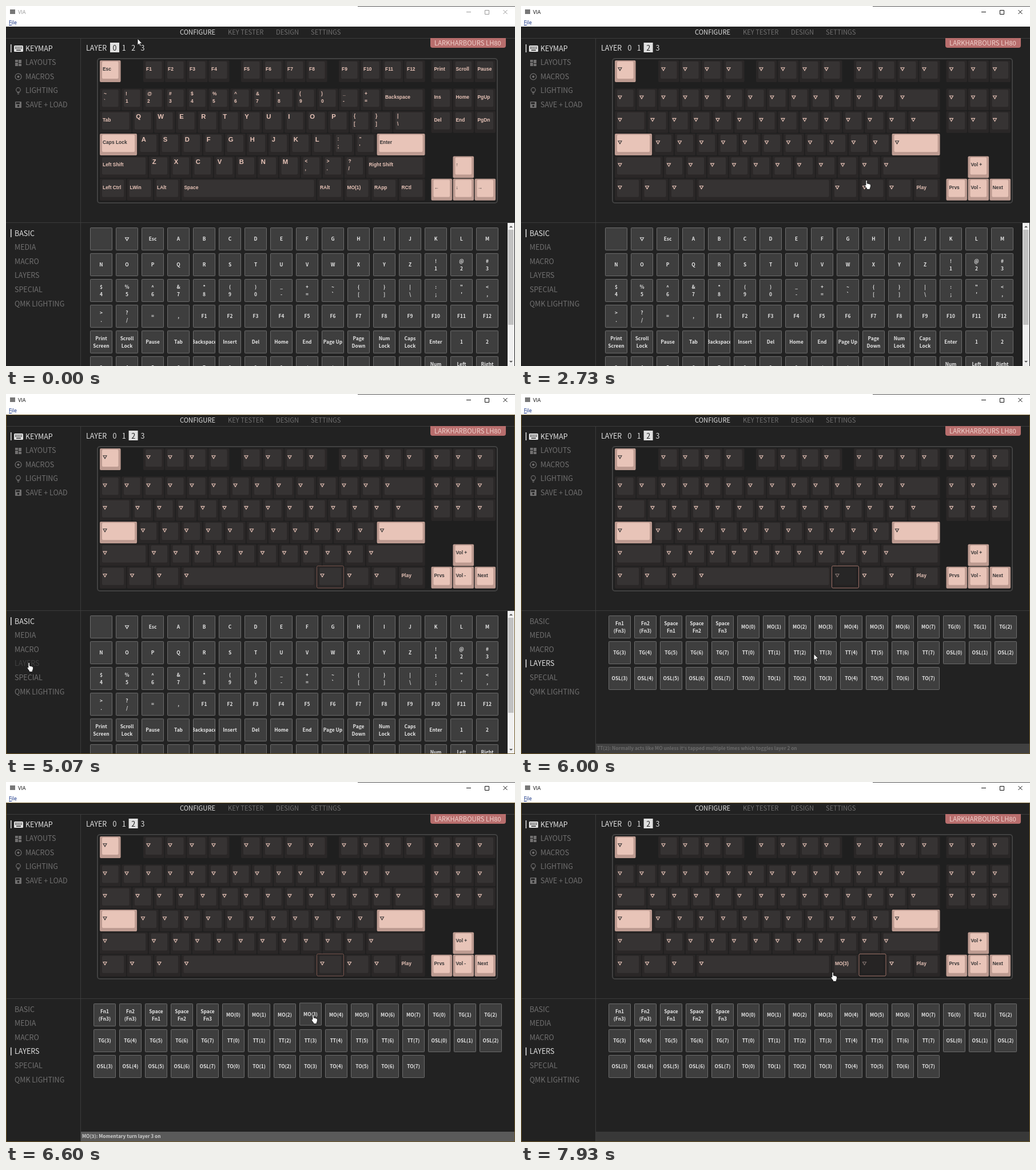
These frames come from a looping animation (890 px wide and 629 px high, 8000 ms). An HTML page with a canvas:

```html
<!DOCTYPE html>
<html lang="en">
<head>
<meta charset="utf-8">
<title>VIA</title>
<style>
html, body { margin: 0; width: 100%; height: 100%; overflow: hidden; background: #222; }
canvas { display: block; }
</style>
</head>
<body>
<canvas id="stage" width="890" height="629"></canvas>
<script>
const c = document.getElementById('stage').getContext('2d');
const UI = '"Noto Sans CJK JP", "Noto Sans CJK SC", "Noto Sans", sans-serif';
const CAP = '"Liberation Sans", Arial, sans-serif';
const SYSTEM = '"Open Sans", "Noto Sans", sans-serif';
const LIGHT = '#e2e2e2', GREY = '#717070', DARK = '#222', PINK = '#e8c4b8';
const LOOP = 8000, ACTIVATE = 800, TO_LAYER1 = 1000, TO_LAYER2 = 2330;
const FOCUS = 3470, SELECT = 3500, OPEN_LAYERS = 5100, ASSIGN = 6970;

// In key labels "·" is a space, "¶" a line break, "=n" a width and ">n" a gap.
const ROWS = [
  [0, 'Esc >1 F1 F2 F3 F4 >.5 F5 F6 F7 F8 >.5 F9 F10 F11 F12 >.25 Print Scroll Pause'],
  [1.25, '~` !1 @2 #3 $4 %5 ^6 &7 *8 (9 )0 _- += Backspace=2 >.25 Ins Home PgUp'],
  [2.25, 'Tab=1.5 Q W E R T Y U I O P {[ }] |\\=1.5 >.25 Del End PgDn'],
  [3.25, 'Caps·Lock=1.75 A S D F G H J K L :; "\' Enter=2.25'],
  [4.25, 'Left·Shift=2.25 Z X C V B N M <, >. ?/ Right·Shift=2.75 >1.25 ↑'],
  [5.25, 'Left·Ctrl=1.25 LWin=1.25 LAlt=1.25 Space=6.25 RAlt=1.25 MO(1)=1.25 RApp=1.25 RCtl=1.25 >.25 ← ↓ →']
];
const ACCENTS = ['Esc', 'Caps·Lock', 'Enter', '↑', '←', '↓', '→'];
const LAYERS = [null, {
  Esc: 'Reset', Print: 'RGBMd+', Scroll: 'RGBMd-', Pause: 'RGBMdSW',
  Ins: 'Hue·-', Home: 'Sat·-', PgUp: 'Brght-', Del: 'Sat·+', End: 'Brght+', PgDn: 'RGB¶SPI',
  N: 'NKRO', RApp: 'MO(2)', '←': 'Hue·+', '↓': 'RGBMd', '→': 'RGBMd'
}, { RCtl: 'Play', '↑': 'Vol·+', '←': 'Prvs', '↓': 'Vol·-', '→': 'Next' }];

const keys = [];
for (const [v, row] of ROWS) {
  let u = 0;
  for (const token of row.split(' ')) {
    const gap = token.match(/^>([\d.]*\d)$/);
    if (gap) { u += +gap[1]; continue; }
    const [, name, size = 1] = token.match(/^(.+?)(?:=([\d.]+))?$/);
    keys.push({ name, x: 164 + u * 38, y: 95 + v * 39.4, w: size * 38 - 1.4, accent: ACCENTS.includes(name) });
    u += +size;
  }
}

const BASIC = ('· ▽ Esc A B C D E F G H I J K L M N O P Q R S T U V W X Y Z !1 @2 #3 ' +
  '$4 %5 ^6 &7 *8 (9 )0 _- += ~` {[ }] |\\ :; "\' <, >. ?/ = , F1 F2 F3 F4 F5 F6 F7 F8 F9 F10 F11 F12 ' +
  'Print¶Screen Scroll¶Lock Pause Tab Backspace Insert Del Home End Page·Up Page¶Down Num¶Lock Caps¶Lock Enter 1 2 ' +
  '3 4 5 6 7 8 9 0 / * - + . Num¶Enter Left¶Shift Right¶Shift').split(' ');
const TIPS = {
  MO: n => `Momentary turn layer ${n} on`,
  TG: n => `Toggle layer ${n} on/off`,
  TT: n => `Normally acts like MO unless it's tapped multiple times which toggles layer ${n} on`,
  OSL: n => `Switch to layer ${n} for one keypress`,
  TO: n => `Turn on layer ${n} when pressed`
};
const LAYER_KEYS = 'Fn1¶(Fn3) Fn2¶(Fn3) Space¶Fn1 Space¶Fn2 Space¶Fn3'.split(' ');
for (const kind in TIPS) for (let n = 0; n < 8; n++) LAYER_KEYS.push(`${kind}(${n})`);

const SIDE = ['KEYMAP', 'LAYOUTS', 'MACROS', 'LIGHTING', 'SAVE + LOAD'];
const TABS = ['BASIC', 'MEDIA', 'MACRO', 'LAYERS', 'SPECIAL', 'QMK LIGHTING'];

// Pointer stops: time, x, y
const PATH = [
  [70, 230, 57], [400, 211, 71], [1000, 213, 71], [1600, 222, 71], [2330, 222, 71],
  [2730, 604, 304], [3130, 595, 314], [3330, 555, 321], [4330, 555, 321], [4930, 40, 469],
  [5270, 40, 469], [5900, 512, 454], [6080, 512, 454], [6450, 537, 406], [7400, 537, 406], [7930, 545, 332]
];
const HAND = new Path2D('M2.4 9V1.5q0-1.2 1.2-1.2t1.2 1.2V6q3 0 5.4 1.6 1 .8.8 2.6-.2 3-1.3 4.3v2H4.2V15Q2.5 13 .4 9.6q-.2-1.5 2-.6z');
const ARROW = new Path2D('M0 0V11.5L2.7 9 4.5 13.2 6.3 12.4 4.5 8.4H8z');

const smooth = u => u * u * (3 - 2 * u);
const lines = s => (s.length === 2 && !/^[A-Z]/.test(s) ? [...s] : s.split('¶')).map(l => l.replace(/·/g, ' '));
const mix = (a, b, p) => `rgb(${a.map((v, i) => Math.round(v + (b[i] - v) * p))})`;

function text(s, x, middle, size, color, font = UI, align = 'left', weight = 400) {
  c.font = `${weight} ${size}px ${font}`;
  c.textAlign = align;
  c.fillStyle = color;
  c.fillText(s, x, middle + size * 0.36);
}
function box(x, y, w, h, fill, radius = 0) {
  c.beginPath();
  c.roundRect(x, y, w, h, radius);
  c.fillStyle = fill;
  c.fill();
}
function frame(x, y, w, h, color, width = 1, radius = 0) {
  c.beginPath();
  c.roundRect(x, y, w, h, radius);
  c.strokeStyle = color;
  c.lineWidth = width;
  c.stroke();
}
function poly(points, color, width) {
  c.beginPath();
  for (let i = 0; i < points.length; i += 2) c.lineTo(points[i], points[i + 1]);
  if (width) { c.strokeStyle = color; c.lineWidth = width; c.stroke(); }
  else { c.fillStyle = color; c.fill(); }
}
function circle(x, y, r, color, fill) {
  c.beginPath();
  c.arc(x, y, r, 0, 7);
  c.fillStyle = c.strokeStyle = color;
  c.lineWidth = 1.2;
  fill ? c.fill() : c.stroke();
}
function triangle(x, y, color) {
  poly([x - 3, y - 2.3, x + 3, y - 2.3, x, y + 2.8, x - 3, y - 2.3, x + 3, y - 2.3], color, 1.1);
}

function pointer(t) {
  let from = PATH[0];
  for (const to of PATH) {
    if (t < to[0]) {
      const p = to === from ? 0 : smooth((t - from[0]) / (to[0] - from[0]));
      return [from[1] + (to[1] - from[1]) * p, from[2] + (to[2] - from[2]) * p];
    }
    from = to;
  }
  return from.slice(1);
}
function panelHit(t) {
  const [x, y] = pointer(t), left = t < OPEN_LAYERS ? 147 : 152.5;
  const col = Math.floor((x - left) / 45), row = Math.floor((y - 387.5) / 45);
  const inside = col >= 0 && col < 16 && row >= 0 && x - left - col * 45 < 39 && y - 387.5 - row * 45 < 39;
  const i = row * 16 + col;
  return inside && i < (t < OPEN_LAYERS ? BASIC : LAYER_KEYS).length ? i : -1;
}
const onDigit = (x, y) => y > 64 && y < 81 && x > 182 && x < 247 ? Math.floor((x - 182) / 16.3) : -1;
const onTab = (x, y) => x > 8 && x < 110 && y > 385 && y < 532 ? Math.floor((y - 385) / 24.6) : -1;

function drawWindow(t) {
  const ink = t < ACTIVATE ? '#999' : '#111';
  box(0, 0, 890, 36, '#fff');
  box(615, 0, 275, 1, '#555');
  box(7, 6, 9, 8, '#777');
  text('VIA', 21, 10.5, 9, ink, SYSTEM);
  text('File', 5, 29, 8.8, '#00217a', SYSTEM);
  box(5, 33, 5, 1, '#00217a');
  poly([805, 10.5, 813, 10.5], ink, 1);
  frame(837.5, 7.5, 7, 7, ink);
  poly([869.5, 7, 876.5, 14], ink, 1);
  poly([876.5, 7, 869.5, 14], ink, 1);
  [['CONFIGURE', 304], ['KEY TESTER', 388], ['DESIGN', 472], ['SETTINGS', 533]]
    .forEach(([s, x], i) => text(s, x, 46, 11.2, i ? GREY : LIGHT));
  box(0, 56, 890, 1, '#3c3c3c');
  box(0, 378, 890, 1, '#3c3c3c');
  box(130, 56, 1, 573, '#3c3c3c');
  box(742, 56, 132, 17, '#b86e6d', [0, 0, 4, 4]);
  text('LARKHARBOURS LH80', 749, 64.5, 11.3, '#f0d2cd');
}

function drawSide() {
  SIDE.forEach((s, i) => text(s, 34, 74 + i * 24.6, 12.5, i ? GREY : LIGHT));
  box(8, 67, 1.5, 14, LIGHT);
  box(14, 69, 16, 11, LIGHT, 1.5);
  for (let i = 0; i < 10; i++) box(16 + i % 5 * 2.6, 71 + (i > 4) * 2.6, 1.4, 1.4, DARK);
  box(18, 76.5, 8, 1.4, DARK);
  box(16, 94, 5, 4, GREY);
  box(16, 99, 5, 6, GREY);
  box(22, 94, 5, 6, GREY);
  box(22, 101, 5, 4, GREY);
  circle(21.5, 123.5, 5.4, GREY);
  circle(21.5, 123.5, 2, GREY, true);
  circle(21.5, 146.5, 3.8, GREY);
  box(19.5, 150, 4, 2, GREY);
  box(20, 153, 3, 1.2, GREY);
  box(16, 167, 11, 11, GREY, 1);
  box(17.5, 168.3, 6.5, 3, DARK);
  circle(21.5, 174.6, 1.8, DARK, true);
}

function drawBoard(t, layer, px, py) {
  text('LAYER', 140, 73, 12.5, LIGHT);
  const hover = onDigit(px, py);
  for (let n = 0; n < 4; n++) {
    const x = 182 + n * 16.3, on = n === layer;
    if (on || n === hover) box(x, 64, 16, 17, on ? '#e0e0e0' : GREY);
    text(n, x + 8, 73, 12.5, on ? DARK : LIGHT, UI, 'center');
  }
  box(159, 91, 701, 254, '#1f1f1f', 4);
  frame(160, 92, 699, 252, '#414141', 2, 4);
  const start = t < ASSIGN ? SELECT : ASSIGN;
  const selected = t < SELECT ? '' : t < ASSIGN ? 'RAlt' : 'MO(1)';
  const u = (t - start) / 750 % 2, glow = smooth(u < 1 ? u : 2 - u);
  for (const { name, x, y, w, accent } of keys) {
    const p = name === selected ? glow : 0;
    const ink = accent ? '#363434' : mix([232, 196, 184], [105, 95, 92], p);
    box(x, y, w, 38, accent ? '#bd9b91' : mix([42, 39, 39], [32, 31, 31], p), 2);
    box(x + 4, y + 2, w - 8, 30, accent ? PINK : mix([54, 51, 51], [34, 33, 33], p), 2);
    if (name === selected) frame(x - 0.5, y - 1.4, w + 0.9, 38.5, mix([122, 86, 78], [172, 124, 114], p), 1, 2);
    let label = LAYERS[layer] ? LAYERS[layer][name] || '▽' : name;
    if (t >= ASSIGN && name === 'RAlt') label = 'MO(3)';
    if (label === '▽') { triangle(x + 9, y + 15, ink); continue; }
    const parts = lines(label), letter = /^[A-Z]$/.test(label), pair = label.length === 2 && parts[1];
    parts.forEach((s, i) => text(s, x + (pair ? 7 : letter ? 6.3 : 5),
      y + (pair ? 8.5 : letter ? 9.5 : 15) + i * 13.5, letter ? 11.25 : 8.44, ink, CAP, 'left', 700));
  }
}

function drawPanel(t, px, py) {
  const open = t >= OPEN_LAYERS, active = open ? 3 : 0, hoverTab = onTab(px, py);
  TABS.forEach((s, i) => text(s, 15, 397 + i * 24.6, 12.5, i === active ? LIGHT : i === hoverTab ? '#414141' : GREY));
  box(8, 390 + active * 24.6, 1.5, 14, LIGHT);

  // Hover fades follow the pointer's last 200 ms.
  const recent = Array.from({ length: 12 }, (_, i) => panelHit(t - i * 200 / 12));
  (open ? LAYER_KEYS : BASIC).forEach((label, i) => {
    const x = (open ? 153 : 147) + i % 16 * 45;
    const y = 387.5 + Math.floor(i / 16) * 45 - 1.4 * recent.filter(h => h === i).length / 12;
    box(x, y, 39, 39, '#3e3e3e', 1);
    frame(x + 0.5, y, 38, 39, '#6c6c6c', 1, 1);
    if (label === '▽') { triangle(x + 19.5, y + 19.5, LIGHT); return; }
    c.save();
    c.beginPath();
    c.rect(x, y, 39, 39);
    c.clip();
    const parts = lines(label);
    parts.forEach((s, n) => text(s, x + 19.5, y + 19.7 + (n - (parts.length - 1) / 2) * 12.6, 8.4, '#e6e6e6', UI, 'center', 700));
    c.restore();
  });

  if (open) {
    const amount = recent.filter(h => h >= 0).length / 12;
    const tip = (LAYER_KEYS[recent.find(h => h >= 0)] || '').match(/^(\w+)\((\d)\)$/);
    box(131, 611, 758, 17, mix([56, 56, 56], [90, 90, 90], amount));
    if (tip) text(`${tip[0]}: ${TIPS[tip[1]](tip[2])}`, 133, 619.5, 8.3, mix([72, 72, 72], [208, 208, 208], amount), UI, 'left', 700);
  } else {
    box(877, 379, 12, 250, '#f0f0f0');
    box(878, 391, 9.5, 166, '#c1c1c1');
    poly([880, 387, 886, 387, 883, 384], '#555');
    poly([880, 620, 886, 620, 883, 623], '#555');
  }
}

function drawPointer(t, x, y) {
  const onKey = keys.some(k => x >= k.x && x < k.x + k.w && y >= k.y && y < k.y + 38);
  const hand = onKey || onDigit(x, y) >= 0 || onTab(x, y) >= 0 || panelHit(t) >= 0;
  c.save();
  c.translate(hand ? x - 3.5 : x, y);
  c.fillStyle = '#fff';
  c.strokeStyle = '#111';
  c.lineWidth = 0.9;
  c.fill(hand ? HAND : ARROW);
  c.stroke(hand ? HAND : ARROW);
  c.restore();
}

function draw(now) {
  const t = now % LOOP, [x, y] = pointer(t);
  const layer = t < TO_LAYER1 ? 0 : t < TO_LAYER2 ? 1 : 2;
  box(0, 0, 890, 629, DARK);
  drawWindow(t);
  drawSide();
  drawBoard(t, layer, x, y);
  drawPanel(t, x, y);
  if (t >= FOCUS) frame(0.5, 36.5, 889, 592, '#6f5a2a');
  drawPointer(t, x, y);
  requestAnimationFrame(draw);
}
requestAnimationFrame(draw);
</script>
</body>
</html>
```
